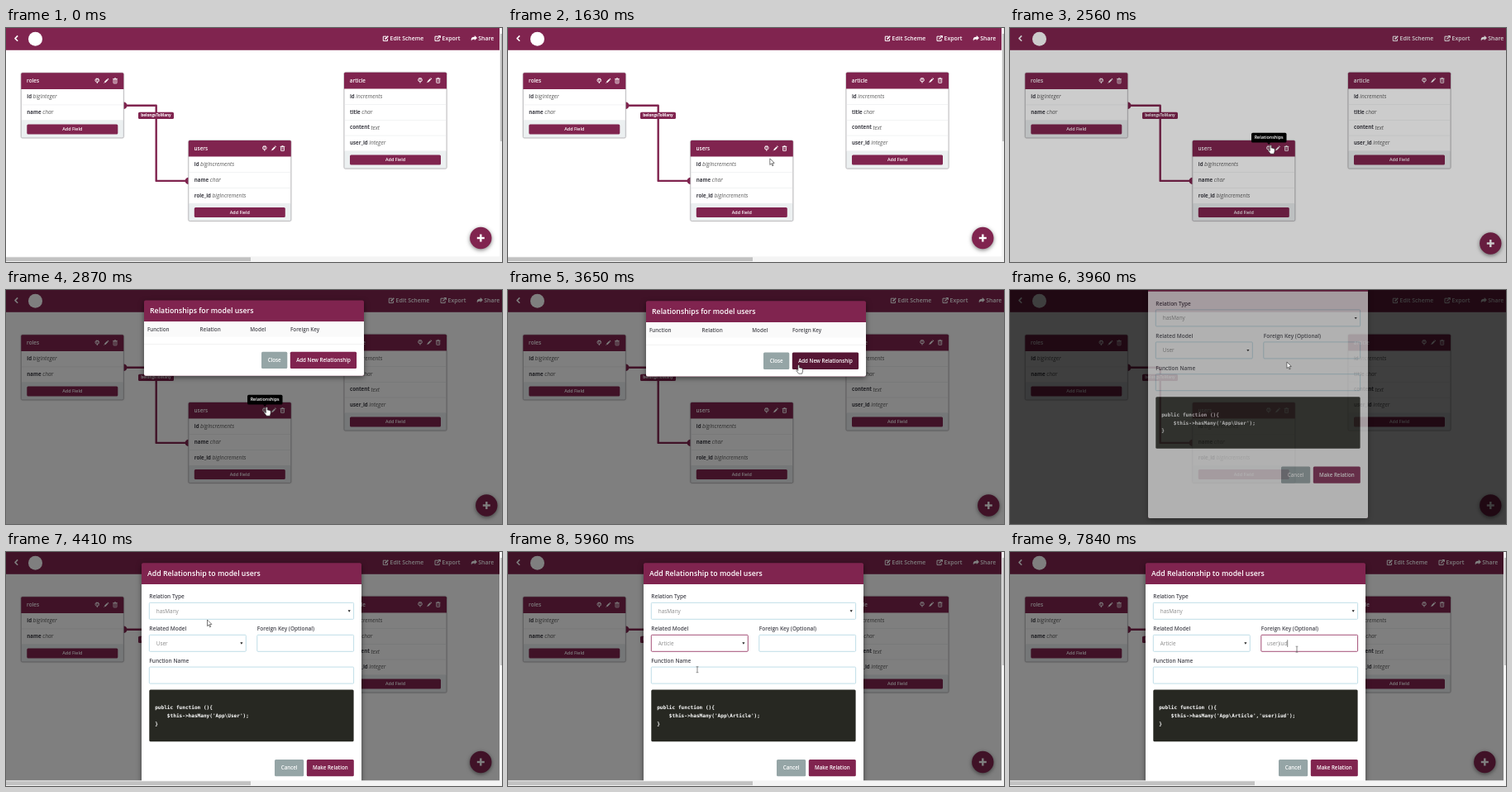
These frames come from a looping animation (600 by 283 pixels, 8 s). An HTML page with a canvas:

```html
<!DOCTYPE html>
<html lang="en">
<head>
<meta charset="utf-8">
<title>Schema designer</title>
<style>
html, body { margin: 0; width: 100%; height: 100%; overflow: hidden; background: #fff; }
canvas { display: block; width: 600px; height: 283px; }
</style>
</head>
<body>
<canvas id="stage"></canvas>
<script>
const W = 600, H = 283, LOOP = 8000;
const WINE = '#80244f', GREY = '#95a5a6', FIELD = '#b9dbe6';
const SANS = '"Open Sans", "Noto Sans", sans-serif';
const MONO = '"DejaVu Sans Mono", monospace';
const dpr = Math.max(1, window.devicePixelRatio || 1);

function setup(canvas) {
  canvas.width = W * dpr;
  canvas.height = H * dpr;
  const c = canvas.getContext('2d');
  c.scale(dpr, dpr);
  return c;
}
const main = setup(document.getElementById('stage'));
const layerCanvas = document.createElement('canvas');
const layer = setup(layerCanvas);
let ctx = main;

const clamp = (v, lo = 0, hi = 1) => Math.min(hi, Math.max(lo, v));
const easeOut = p => 1 - (1 - clamp(p)) ** 1.7;

// Spans of screen activity: start, end, number of steps
const spans = [
  [250, 1010, 11], [1170, 1860, 10], [2560, 3330, 11], [3410, 3480, 2],
  [3650, 4410, 11], [4480, 5170, 10], [5340, 5640, 5], [5960, 6420, 7]
];

function held(t) {
  let time = 0;
  for (const [a, b, n] of spans) {
    if (t < a) break;
    const step = (b - a) / (n - 1);
    time = a + Math.min(n - 1, Math.floor((t - a + 5) / step)) * step;
  }
  return time;
}

// ---------- drawing helpers ----------
function rect(x, y, w, h, color) {
  ctx.fillStyle = color;
  ctx.fillRect(x, y, w, h);
}

function round(x, y, w, h, r, fill, stroke, lw = 0.8) {
  ctx.beginPath();
  ctx.roundRect(x, y, w, h, r);
  if (fill) { ctx.fillStyle = fill; ctx.fill(); }
  if (stroke) { ctx.strokeStyle = stroke; ctx.lineWidth = lw; ctx.stroke(); }
}

function disc(x, y, r, color) {
  ctx.beginPath();
  ctx.arc(x, y, r, 0, Math.PI * 2);
  ctx.fillStyle = color;
  ctx.fill();
}

function line(points, color, lw) {
  ctx.beginPath();
  points.forEach(([x, y], i) => i ? ctx.lineTo(x, y) : ctx.moveTo(x, y));
  ctx.strokeStyle = color;
  ctx.lineWidth = lw;
  ctx.lineJoin = 'round';
  ctx.stroke();
}

function text(s, x, y, size, color, style = '', align = 'left', family = SANS) {
  ctx.font = `${style} ${size}px ${family}`;
  ctx.textAlign = align;
  ctx.fillStyle = color;
  ctx.fillText(s, x, y + size * 0.33);
  return ctx.measureText(s).width;
}

function button(x, y, w, h, label, size, color = WINE) {
  round(x, y, w, h, 1.5, color);
  text(label, x + w / 2, y + h / 2, size, '#fff', '600', 'center');
}

function at(x, y, draw) {
  ctx.save();
  ctx.translate(x, y);
  draw();
  ctx.restore();
}

// ---------- icons ----------
const plug = (x, y) => at(x, y, () => {
  round(-2.3, -2.2, 4.6, 3.6, 1.6, null, '#fff', 0.9);
  line([[0, 1], [0, 3.3]], '#fff', 1);
  line([[-0.9, -3.2], [-0.9, 0.2]], '#fff', 0.7);
  line([[0.9, -3.2], [0.9, 0.2]], '#fff', 0.7);
});

const pencil = (x, y) => at(x, y, () => {
  line([[-1.9, 1.9], [1.3, -1.3]], '#fff', 1.8);
  line([[1.7, -1.7], [2.4, -2.4]], '#fff', 1.8);
  line([[-2.9, 2.9], [-1.6, 1.6]], '#fff', 0.9);
});

const trash = (x, y) => at(x, y, () => {
  round(-2, -1.6, 4, 4.8, 0.5, null, '#fff', 0.8);
  line([[-2.8, -2], [2.8, -2]], '#fff', 0.9);
  line([[-0.9, -2.9], [0.9, -2.9]], '#fff', 0.8);
  line([[-0.6, -0.6], [-0.6, 2.2]], '#fff', 0.5);
  line([[0.6, -0.6], [0.6, 2.2]], '#fff', 0.5);
});

const openBox = () => line([[0.8, -2.4], [-3, -2.4], [-3, 3], [2.2, 3], [2.2, 0.6]], '#fff', 1);

const editIcon = (x, y) => at(x, y, () => {
  openBox();
  line([[-0.8, 1], [3, -2.8]], '#fff', 1.6);
});

const exportIcon = (x, y) => at(x, y, () => {
  openBox();
  line([[-0.8, 1], [3, -2.8]], '#fff', 1.1);
  line([[0.9, -3], [3.3, -3], [3.3, -0.6]], '#fff', 1.1);
});

const shareIcon = (x, y) => at(x, y, () => {
  ctx.beginPath();
  ctx.moveTo(4, -0.6);
  ctx.lineTo(0.8, -3.6);
  ctx.lineTo(0.8, -1.9);
  ctx.quadraticCurveTo(-4.6, -1.8, -3, 3.2);
  ctx.quadraticCurveTo(-2.6, 0.7, 0.8, 0.8);
  ctx.lineTo(0.8, 2.4);
  ctx.closePath();
  ctx.fillStyle = '#fff';
  ctx.fill();
});

// ---------- page ----------
const tables = [
  { name: 'roles', x: 18.3, y: 54.3, rows: ['id bigInteger', 'name char'] },
  { name: 'users', x: 220.8, y: 136, rows: ['id bigIncrements', 'name char', 'role_id bigIncrements'] },
  { name: 'article', x: 409, y: 53.8, rows: ['id increments', 'title char', 'content text', 'user_id integer'] }
];

function drawTable({ name, x, y, rows }) {
  const w = 124, foot = y + 20 + 18.8 * rows.length;
  ctx.save();
  ctx.shadowColor = 'rgba(0,0,0,.25)';
  ctx.shadowBlur = 2 * dpr;
  round(x, y, w, foot + 21 - y, 1.5, '#fff');
  ctx.restore();
  rect(x, foot, w, 21, '#ecf0f1');
  round(x, y, w, foot + 21 - y, 1.5, null, '#b3b0b4', 0.8);
  round(x, y, w, 19.6, [1.5, 1.5, 0, 0], WINE);
  text(name, x + 6.8, y + 10, 6.3, '#fff', '600');
  plug(x + w - 32, y + 9.4);
  pencil(x + w - 20.8, y + 9.4);
  trash(x + w - 10.3, y + 9.4);
  rows.forEach((row, i) => {
    const [field, type] = row.split(' '), cy = y + 29 + 18.8 * i;
    const fw = text(field, x + 7, cy, 6.1, '#3c3c44', 'bold');
    text(type, x + 8.6 + fw, cy, 6.6, '#5c5c5c', 'italic');
    rect(x + 0.5, y + 38.4 + 18.8 * i, w - 1, 0.5, '#e4e6e8');
  });
  button(x + 7, foot + 4.6, 110, 12, 'Add Field', 5.4);
}

function drawLink() {
  disc(142.3, 93.8, 4.2, WINE);
  disc(220.8, 184.9, 4.2, WINE);
  line([[142, 93.8], [181.7, 93.8], [181.7, 184.9], [221, 184.9]], WINE, 2.4);
  round(160, 101.8, 43, 8.2, 1.6, WINE);
  text('belongsToMany', 181.5, 105.8, 4.7, '#fff', 'bold', 'center');
}

function drawPage(shift) {
  rect(0, 0, W, H, '#fff');
  drawLink();
  tables.forEach(drawTable);
  rect(0, 0, W, 26.8, WINE);
  line([[14.2, 9.4], [11, 12.6], [14.2, 15.8]], '#fff', 1.5);
  disc(35.5, 13.2, 8.5, '#fff');
  const dx = shift ? 7 : 0, dy = shift ? 6.5 : 0;
  const nav = (s, x) => text(s, x + dx, 12.7, 6.9, '#fff', '600');
  editIcon(459.3 + dx, 12.6);
  nav('Edit Scheme', 464.6);
  exportIcon(522 + dx, 12.6);
  nav('Export', 527.6);
  shareIcon(566 + dx, 12.6);
  nav('Share', 571.3);
  ctx.save();
  ctx.shadowColor = 'rgba(0,0,0,.5)';
  ctx.shadowBlur = 5 * dpr;
  ctx.shadowOffsetY = 1.5 * dpr;
  disc(574.3 + dx, 254 + dy, 13.2, WINE);
  ctx.restore();
  rect(569.8 + dx, 252.8 + dy, 9, 2.4, '#fff');
  rect(573.1 + dx, 249.5 + dy, 2.4, 9, '#fff');
}

function drawScrollbars() {
  rect(597, 0, 3, H, '#f4f4f4');
  rect(597.9, 7, 2.1, 130, '#c1c1c1');
  rect(0, 276.3, W, 6.7, '#f4f4f4');
  rect(0, 277.3, 296, 4.8, '#c1c1c1');
}

function drawTooltip(alpha) {
  ctx.globalAlpha = alpha;
  round(292, 126.8, 42.5, 11.8, 1.7, '#000');
  text('Relationships', 313.2, 132.6, 5.4, '#fff', '600', 'center');
  ctx.beginPath();
  ctx.moveTo(310.8, 138.4);
  ctx.lineTo(315.4, 138.4);
  ctx.lineTo(313.1, 140.8);
  ctx.fillStyle = '#000';
  ctx.fill();
  ctx.globalAlpha = 1;
}

// ---------- dialogs ----------
function fade(alpha, draw) {
  if (alpha <= 0) return;
  ctx = layer;
  ctx.clearRect(0, 0, W, H);
  draw();
  ctx = main;
  ctx.globalAlpha = Math.min(1, alpha);
  ctx.drawImage(layerCanvas, 0, 0, W, H);
  ctx.globalAlpha = 1;
}

function dialog(x, y, h, title) {
  ctx.save();
  ctx.shadowColor = 'rgba(0,0,0,.5)';
  ctx.shadowBlur = 6 * dpr;
  ctx.shadowOffsetY = 2 * dpr;
  round(x, y, 266, h, 2, WINE);
  ctx.restore();
  round(x, y + 25.8, 266, h - 25.8, [0, 0, 2, 2], '#fff');
  text(title, x + 7, y + 12.8, 8.75, '#fff', '600');
}

function drawList(y, pressed) {
  const x = 167;
  dialog(x, y, 91.3, 'Relationships for model users');
  rect(x, y + 25.8, 266, 18.5, '#fafafa');
  rect(x, y + 53, 266, 0.5, '#e5e5e5');
  [['Function', 171], ['Relation', 234.5], ['Model', 295.3], ['Foreign Key', 344]]
    .forEach(([s, cx]) => text(s, cx, y + 35.3, 6.3, '#4a4a50', '600'));
  button(309, y + 62.3, 31.3, 20.3, 'Close', 6.2, GREY);
  button(343.8, y + 62.3, 80.3, 20.3, 'Add New Relationship', 6.2, pressed ? '#561634' : WINE);
}

function field(x, y, w, focus, value, select) {
  round(x, y, w, 20, 1, '#fff', focus ? '#9a3b68' : FIELD, 0.9);
  const tw = value ? text(value, x + (select ? 8.5 : 7), y + 10.2, 6.4, '#8b8b8b') : 0;
  if (select) {
    ctx.beginPath();
    ctx.moveTo(x + w - 7, y + 9);
    ctx.lineTo(x + w - 3.8, y + 9);
    ctx.lineTo(x + w - 5.4, y + 11.4);
    ctx.fillStyle = '#222';
    ctx.fill();
  }
  return x + 7 + tw;
}

const keyTimes = [6970, 7140, 7210, 7210, 7440, 7760, 7760, 7840];

function drawForm(x, y, t) {
  const model = t < 5960 ? 'User' : 'Article';
  const typed = 'user)iud'.slice(0, keyTimes.filter(k => k <= t).length);
  const keyFocus = t >= 6415, lx = x + 9.3;
  const label = (s, cx, cy) => text(s, cx, y + cy, 6.5, '#45454d', '600');

  dialog(x, y, 300, 'Add Relationship to model users');
  label('Relation Type', lx, 41);
  field(lx, y + 48, 247.3, false, 'hasMany', true);
  label('Related Model', lx, 79.8);
  field(lx, y + 87, 117, t >= 5090 && !keyFocus, model, true);
  label('Foreign Key (Optional)', x + 139.8, 79.8);
  const end = field(x + 139.8, y + 87, 116.8, keyFocus, typed);
  if (keyFocus && !(t >= 6820 && t < 6970)) rect(end + 0.2, y + 93, 0.6, 8.6, '#333');
  label('Function Name', lx, 119);
  field(lx, y + 125.8, 247.3, false);

  round(lx, y + 153.3, 247.3, 62.6, 1.5, '#272822');
  const arg = typed && `,'${typed}'`;
  ['public function (){', `    $this->hasMany('App\\${model}'${arg});`, '}'].forEach((s, i) =>
    text(s, x + 16.2, y + 174.8 + 9.8 * i, 6.1, '#fff', 'bold', 'left', MONO));

  button(x + 161, y + 237.6, 35.2, 20.3, 'Cancel', 6.2, GREY);
  button(x + 199.8, y + 237.6, 57, 20.3, 'Make Relation', 6.2);
}

function drawOptions(T) {
  const chosen = T < 5490 ? 1 : 2;
  rect(173.3, 120.6, 117.2, 29.6, '#fff');
  ['Role', 'User', 'Article'].forEach((s, i) => {
    if (i === chosen) rect(173.6, 121 + 9.6 * i, 116.6, 9.6, '#1e90ff');
    text(s, 181.8, 125.8 + 9.6 * i, 6.4, i === chosen ? '#fff' : '#777');
  });
  ctx.strokeStyle = '#8a8a8a';
  ctx.lineWidth = 0.5;
  ctx.strokeRect(173.3, 120.6, 117.2, 29.6);
}

// ---------- pointer ----------
// start, end, steps, then bend and target of each curve
const moves = [
  [250, 1010, 11, 330, 128, 308, 212],
  [1170, 1860, 10, 322, 180, 314.6, 141.6],
  [3022, 3330, 5, 345, 118, 351, 96],
  [3410, 3480, 2, 351, 93, 351, 90.6],
  [3878, 4410, 8, 300, 78, 243.5, 82],
  [4480, 5170, 10, 232, 88, 229, 113],
  [5340, 5640, 5, 229, 125, 229, 138.5],
  [6036, 6420, 6, 290, 122, 347, 114]
];

function pointerAt(t) {
  let x = 512, y = 263;
  for (const [a, b, n, cx, cy, ex, ey] of moves) {
    if (t < a - 3) break;
    const k = Math.floor((t - a + 5) / ((b - a) / (n - 1)));
    const p = Math.min(1, (k + 1) / n), s = p * p * (3 - 2 * p), q = 1 - s;
    x = q * q * x + 2 * q * s * cx + s * s * ex;
    y = q * q * y + 2 * q * s * cy + s * s * ey;
  }
  return [x, y];
}

const shapes = {
  arrow: '0,0 0,7.6 1.8,6 3,8.8 4.2,8.3 3,5.6 5.4,5.4',
  hand: '-.2,.7 .7,0 1.6,.7 1.6,3.5 3.4,3.7 5.6,4.6 5.6,7.4 4.7,10.6 .6,10.6 -2.4,6.7 -1.8,5.8 -.2,7'
};

function drawPointer(t) {
  if (t < 250) return;
  const [x, y] = pointerAt(t);
  const overIcon = t >= 1780 && t < 3020, overButton = t >= 3405 && t < 3875;
  const inKey = x > 304 && y > 96 && y < 121, inName = y > 135;
  at(x, y, () => {
    if (t >= 5960 && (inKey || inName)) {
      line([[0, 0.4], [0, 7]], '#555', 0.7);
      line([[-1.4, 0.2], [1.4, 0.2]], '#555', 0.6);
      line([[-1.4, 7.2], [1.4, 7.2]], '#555', 0.6);
      return;
    }
    const points = shapes[overIcon || overButton ? 'hand' : 'arrow'];
    const path = new Path2D(`M${points}Z`);
    ctx.fillStyle = '#fff';
    ctx.strokeStyle = '#222';
    ctx.lineWidth = 0.6;
    ctx.fill(path);
    ctx.stroke(path);
  });
}

// ---------- frame ----------
const shade = alpha => rect(0, 0, W, H, `rgba(0,0,0,${clamp(alpha, 0, 0.5)})`);

function render(t) {
  const T = held(t);
  const wide = t >= 2560 && T < 4160;
  const listOpen = 2610, swap = 3715, formOpen = swap + 150;
  ctx = main;
  drawPage(wide);

  // The two backdrops overlap while one dialog replaces the other
  if (t >= 2560) shade(Math.min(0.2 + (T - 2560) / 300, 0.5 - (T - swap - 300) / 300));
  shade((T - swap) / 300);

  if (T > listOpen && T < formOpen + 10) {
    const drop = easeOut((T - listOpen) / 300) - easeOut((T - swap) / 300);
    const alpha = clamp((T - listOpen) / 150) - clamp((T - swap) / 150);
    fade(alpha, () => drawList(13.3 - 23 * (1 - drop), T >= 3645));
  }
  if (T > formOpen) {
    const y = 13.3 - 68 * (1 - easeOut((T - formOpen) / 300));
    fade(clamp((T - formOpen) / 150), () => drawForm(wide ? 167 : 164, y, t));
  }
  if (t >= 5090 && t < 5960) drawOptions(T);
  if (!wide) drawScrollbars();
  if (t >= 1780 && t < 3020) drawTooltip(clamp((T - 1710) / 150));
  drawPointer(t);
}

function tick() {
  render(performance.now() % LOOP);
  requestAnimationFrame(tick);
}
tick();
</script>
</body>
</html>
```
